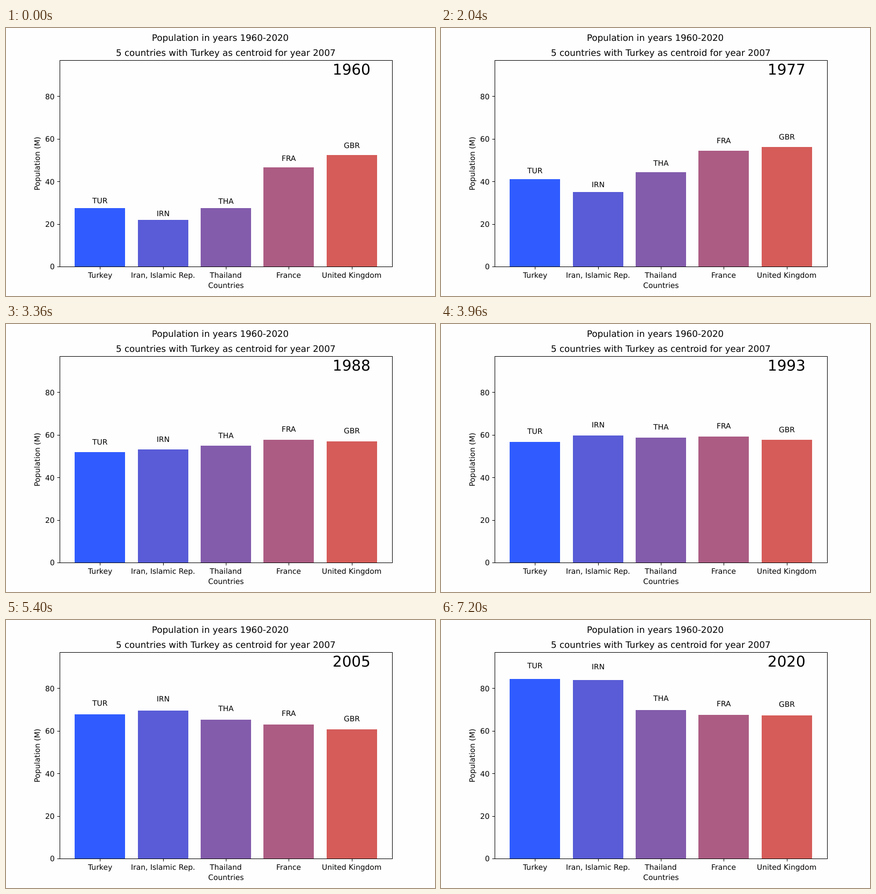
An HTML page with a canvas for the animation above (7.32 s loop, 800 px wide and 500 px high).

```html
<!DOCTYPE html>
<html lang="en">
<head>
<meta charset="utf-8">
<title>Population 1960-2020</title>
<style>
  html, body { margin: 0; width: 100%; height: 100%; overflow: hidden; background: #fefefe; }
  canvas { display: block; }
</style>
</head>
<body>
<canvas id="stage" width="800" height="500"></canvas>
<script>
const ctx = document.getElementById('stage').getContext('2d');
const FIRST_YEAR = 1960, YEARS = 61, YEAR_MS = 120, KNOT_YEARS = 10;
const LEFT = 100, RIGHT = 720, TOP = 60, BASE = 445;
const SCALE = 385 / 96.99; // pixels per million
const BAR_WIDTH = 93.94, BAR_STEP = 117.42, FIRST_CENTER = 175.15;

// Population in millions at the turn of each decade
const countries = [
  { name: 'Turkey', code: 'TUR', pop: [27.47, 34.88, 43.98, 53.92, 63.24, 72.5, 84.34] },
  { name: 'Iran, Islamic Rep.', code: 'IRN', pop: [21.91, 28.5, 38.6, 56.4, 65.6, 73.8, 83.99] },
  { name: 'Thailand', code: 'THA', pop: [27.4, 36.8, 47.4, 56.5, 62.95, 67.2, 69.8] },
  { name: 'France', code: 'FRA', pop: [46.62, 52, 55.3, 58.35, 61, 65.03, 67.39] },
  { name: 'United Kingdom', code: 'GBR', pop: [52.4, 55.66, 56.31, 57.25, 58.9, 62.7, 67.22] }
];

// Catmull-Rom curve through the decade values, extended straight at both ends
function population(pop, age) {
  const last = pop.length - 1;
  const i = Math.min(Math.floor(age / KNOT_YEARS), last - 1);
  const t = age / KNOT_YEARS - i;
  const a = pop[i], b = pop[i + 1];
  const before = pop[i - 1] ?? 2 * a - b;
  const after = pop[i + 2] ?? 2 * b - a;
  return a + (b - a) * t * t * (3 - 2 * t)
    + (b - before) / 2 * t * (1 - t) ** 2
    - (after - a) / 2 * t * t * (1 - t);
}

// Text starts on whole pixels; align is the share of the width left of x
function text(str, x, y, points = 10, align = 0.5) {
  ctx.font = `${points * 100 / 72}px "DejaVu Sans", sans-serif`;
  ctx.textRendering = 'geometricPrecision';
  ctx.fillStyle = '#000';
  ctx.fillText(str, Math.round(x - ctx.measureText(str).width * align), Math.round(y));
}

function line(x1, y1, x2, y2) {
  ctx.beginPath();
  ctx.moveTo(x1, y1);
  ctx.lineTo(x2, y2);
  ctx.stroke();
}

function drawAxes() {
  ctx.strokeRect(LEFT + 0.5, TOP + 0.5, RIGHT - LEFT, BASE - TOP);
  for (let value = 0; value <= 80; value += 20) {
    const y = BASE - value * SCALE;
    const tick = Math.round(y) + 0.5;
    line(LEFT - 4.4, tick, LEFT + 0.5, tick);
    text(value, LEFT - 9.3, y + 5.4, 10, 1);
  }
  text('Population in years 1960-2020', 400, 23.6, 12);
  text('5 countries with Turkey as centroid for year 2007', 410, 51.67, 12);
  text('Countries', 410, 485);
  ctx.save();
  ctx.translate(63, 253);
  ctx.rotate(-Math.PI / 2);
  text('Population (M)', 0, 0);
  ctx.restore();
}

function drawBar({ name, code, pop }, index, age) {
  const center = FIRST_CENTER + index * BAR_STEP;
  const left = Math.round(center - BAR_WIDTH / 2);
  const right = Math.round(center + BAR_WIDTH / 2);
  const height = population(pop, age) * SCALE;
  const top = Math.round(BASE - height);
  const mix = index / 4;
  ctx.fillStyle = `rgb(${48 + 165 * mix}, 92, ${255 - 166 * mix})`;
  ctx.fillRect(left, top, right - left, BASE - top);
  text(code, center, BASE - height * 1.05 - 3.05);
  text(name, center, 466);
  const tick = Math.round(center) + 0.5;
  line(tick, BASE + 0.5, tick, BASE + 5.4);
}

function draw(now) {
  const age = Math.floor(now / YEAR_MS) % YEARS;
  ctx.fillStyle = '#fefefe';
  ctx.fillRect(0, 0, 800, 500);
  countries.forEach((country, i) => drawBar(country, i, age));
  drawAxes();
  text(FIRST_YEAR + age, 644.8, 87, 20);
}

const start = performance.now();
function tick() {
  draw(performance.now() - start);
  requestAnimationFrame(tick);
}
tick();
</script>
</body>
</html>
```
